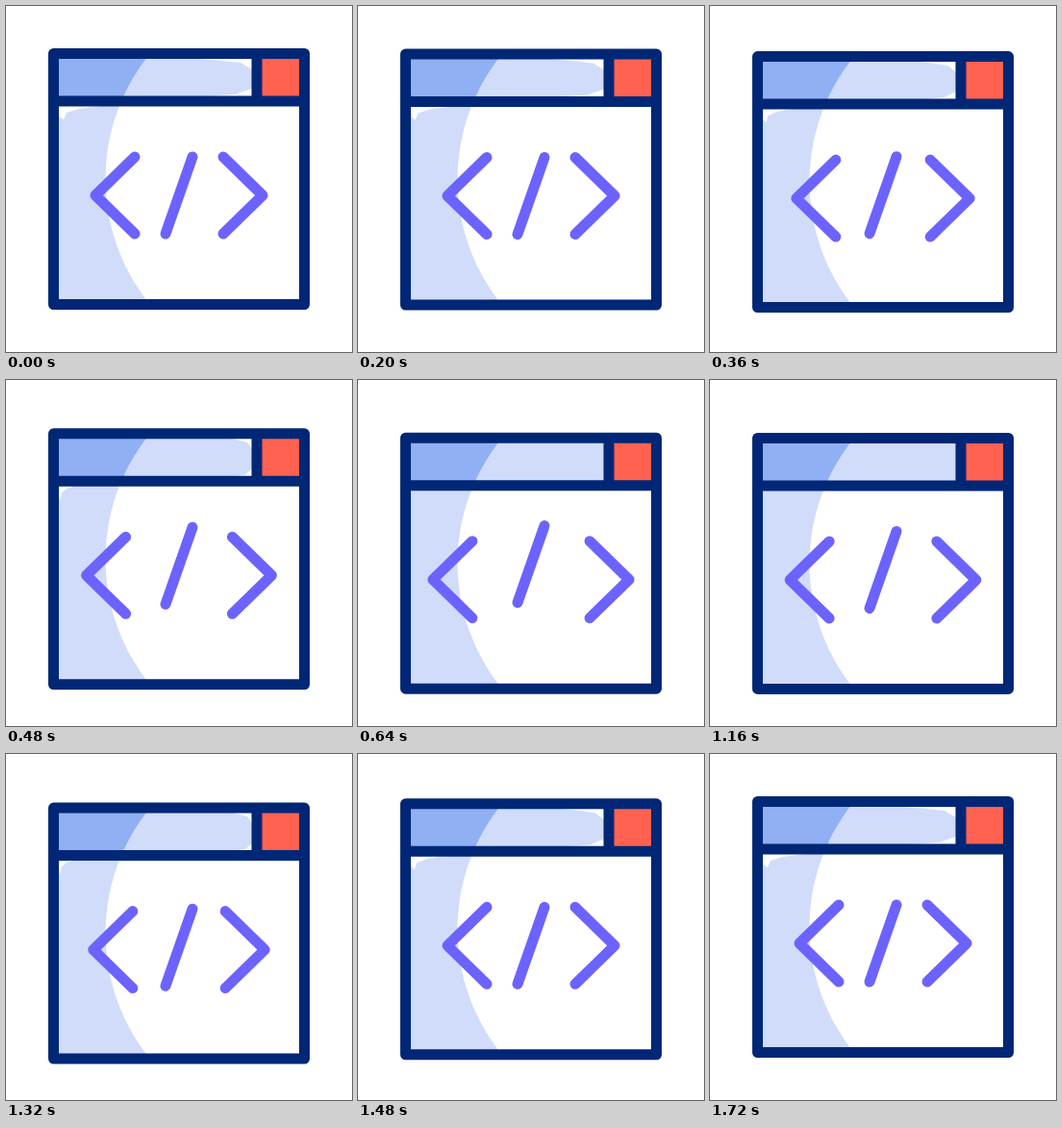
An HTML page that plays this animation: 360 px wide and 360 px high, repeating every 1.76 s.

```html
<!DOCTYPE html>
<html lang="en">
<head>
<meta charset="utf-8">
<title>Code window</title>
<style>
  html, body { margin: 0; width: 100%; height: 100%; overflow: hidden; background: #fff; }
  svg { display: block; width: 100vw; height: 100vh; }
  .frame, .code { fill: none; stroke-width: 11; stroke-linecap: round; stroke-linejoin: round; }
  .frame { stroke: #002776; }
  .code { stroke: #6c63ff; }
</style>
</head>
<body>
<svg viewBox="0 0 360 360">
  <defs>
    <clipPath id="header"><path d="M50 50H261V99H50Z"/></clipPath>
    <clipPath id="body"><path d="M50 99H310V310H50Z"/></clipPath>
  </defs>
  <g id="window">
    <path fill="#fff" d="M50 50H310V310H50Z"/>
    <path fill="#91b0f3" d="M50 50H261V99H50Z"/>
    <circle cx="310.5" cy="180" r="207" fill="#d1dcfb" clip-path="url(#header)"/>
    <path fill="#d1dcfb" d="M50 99H180V310H50Z"/>
    <circle cx="310.5" cy="180" r="207" fill="#fff" clip-path="url(#body)"/>
    <g fill="#fff">
      <path class="glint" data-x="256" d="M256 54H190L225 57L244 59L256 66Z"/>
      <path class="glint" data-x="256" d="M256 95H190L238 92L256 86Z"/>
      <path class="glint" data-x="55" d="M55 104H100L76 107L63 111L60 118L55 115Z"/>
    </g>
    <path fill="#ff6250" d="M261 50H310V99H261Z"/>
    <path class="frame" d="M49.5 49.5H310.5V310.5H49.5ZM49.5 99H310.5M261 49.5V99"/>
    <path id="left" class="code" d="M134 157L93 197L134 237"/>
    <path id="slash" class="code" d="M194 157L166 237"/>
    <path id="right" class="code" d="M226 157L267 197L226 237"/>
  </g>
</svg>
<script>
  const LOOP = 1760, STEP = 40;
  const el = id => document.getElementById(id);
  const move = (node, x, y) => node.setAttribute("transform", `translate(${x} ${y})`);
  const glints = document.querySelectorAll(".glint");

  const ease = (t, from, to) => {
    const p = Math.min(1, Math.max(0, (t - from) / (to - from)));
    const a = p ** 1.8, b = (1 - p) ** 1.8;
    return a / (a + b);
  };

  function draw(t) {
    const drop = 13.5 * (ease(t, 80, 910) - ease(t, 910, 1720));
    const spread = ease(t, 200, 700) - ease(t, 940, 1460);
    move(el("window"), 0, drop);
    move(el("left"), -15.5 * spread, 0);
    move(el("right"), 15.5 * spread, 0);
    move(el("slash"), 0, -16.5 * spread);

    // The highlights shrink towards their edge as the window sinks.
    const size = Math.max(0, 1 - drop / 10);
    for (const g of glints) {
      const x = +g.dataset.x;
      g.setAttribute("transform", `translate(${x * (1 - size)} 0) scale(${size} 1)`);
    }
  }

  const start = performance.now();
  function tick() {
    const t = (performance.now() - start) % LOOP;
    draw(Math.floor(t / STEP) * STEP);
    requestAnimationFrame(tick);
  }
  tick();
</script>
</body>
</html>
```
